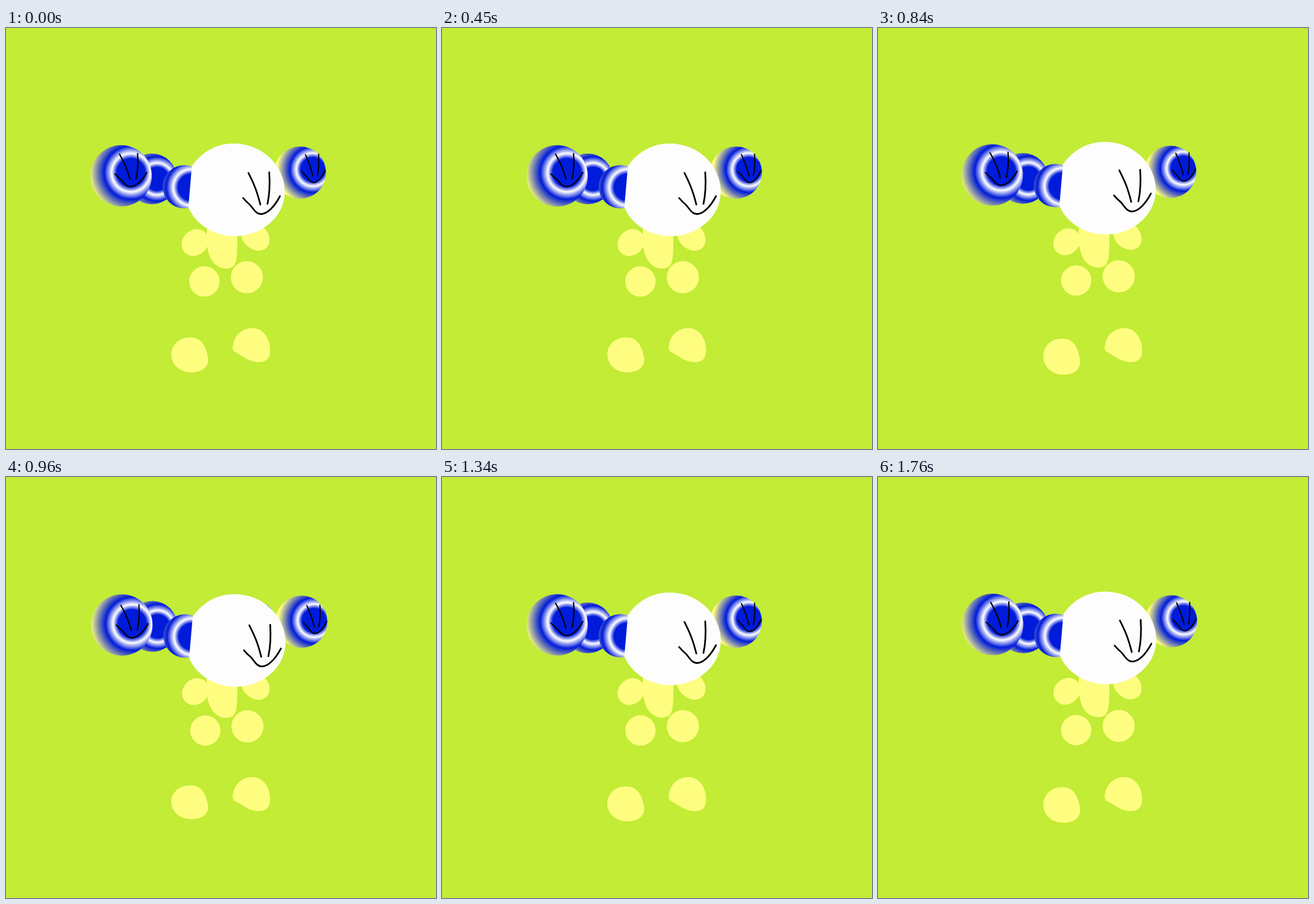
An HTML page with a canvas that plays this animation: 723x707 px, repeating every 1790 ms.

```html
<!DOCTYPE html>
<html>
<head>
<meta charset="utf-8">
<style>
html, body { margin: 0; width: 100%; height: 100%; overflow: hidden; background: #c2ec36; }
canvas { display: block; }
</style>
</head>
<body>
<canvas id="stage" width="723" height="707"></canvas>
<script>
const ctx = document.getElementById('stage').getContext('2d');
const LOOP = 1790, STEPS = 15, TURN = Math.PI * 2;
const GREEN = '#c2ec36', YELLOW = '#fffd80', BLUE = '#001bda', WHITE = '#fdfdfd';

const torsoPath = new Path2D('M339 330C335 352 337 373 345 388C354 404 372 407 382 400C390 393 389 372 389 330Z');
const leftFoot = new Path2D('M308 522C330 521 336 538 340 558C341 575 329 583 311 583C293 583 278 570 278 552C278 535 291 522 308 522');
const rightFoot = new Path2D('M414 504C433 504 444 522 444 540C444 553 440 561 425 561C408 561 399 551 385 544C380 541 381 537 382 532C384 516 397 504 414 504Z');
const headPath = new Path2D('M-75-39.5C-58-65-32-77.5-5-77.5C44-77.5 81-40 81 3.5C81 45 43 78-4 78C-37 78-69 59-81 29.5Z');
const facePath = new Path2D('M-22-34C-13-16-8-5-2 19M13-35Q15-5 10 18M-31 8Q-26 14-20 19C-14 25-10 35-1 35C9 35 21 24 31 5');

// Position in the 15-step bounce.
let step = 0;

// Sideways drift: 1 at the step `peak`.
const drift = peak => Math.cos((step - peak) / STEPS * TURN);

// A pulse of height 1 at the step `peak`; skew makes it come fast and leave slowly.
function pulse(peak, skew) {
  const a = (step - peak) / STEPS * TURN;
  return ((1 + Math.cos(a - skew * (1 - Math.cos(a)))) / 2) ** 2.5;
}

// A part resting at x, y that sways sideways and hops up once per bounce.
const place = (x, y, { sway = 0, right = 3.3, hop = 0, top = 8, skew = 0.4 }) =>
  [x + sway * drift(right), y - hop * pulse(top, skew)];

const shift = ([x, y], dx, dy) => [x + dx, y + dy];

function ellipse([x, y], rx, ry, turn, fill) {
  ctx.fillStyle = fill;
  ctx.beginPath();
  ctx.ellipse(x, y, rx, ry, turn, 0, TURN);
  ctx.fill();
}

const circle = (p, r, fill) => ellipse(p, r, r, 0, fill);

function ball(p, r, [gx, gy], reach) {
  const g = ctx.createRadialGradient(gx, gy, 0, gx, gy, reach);
  g.addColorStop(0.34, BLUE);
  g.addColorStop(0.46, '#fff');
  g.addColorStop(0.64, BLUE);
  g.addColorStop(1, YELLOW);
  circle(p, r, g);
}

function face([x, y], sx, sy, width) {
  const path = new Path2D();
  path.addPath(facePath, new DOMMatrix([sx, 0, 0, sy, x, y]));
  ctx.lineWidth = width;
  ctx.stroke(path);
}

function shape(path, [x, y], fill, stretch = 1) {
  ctx.save();
  ctx.translate(x, y);
  ctx.scale(1, stretch);
  ctx.fillStyle = fill;
  ctx.fill(path);
  ctx.restore();
}

function drawLegs() {
  // The tapping foot flattens while it lifts.
  const lift = pulse(2.3, 0), stretch = 1 - 0.074 * lift;
  shape(leftFoot, [0, 522 * (1 - stretch) - 4 * lift], YELLOW, stretch);
  shape(rightFoot, [0, 0], YELLOW);
  circle(place(335.4, 425.8, { sway: 2.2, right: 6, hop: 8.6, top: 7.9 }), 25.5, YELLOW);
  circle(place(406.2, 418.8, { sway: 1.5, right: 6, hop: 7.8, top: 8.1 }), 27, YELLOW);
  ellipse(place(318.3, 360.5, { sway: 1, right: 5, hop: 9, top: 7.7 }), 24, 21, -Math.PI / 4, YELLOW);
  ellipse(place(419, 350, { hop: 8 }), 27, 21, Math.PI / 4, YELLOW);
  shape(torsoPath, place(0, 1, { hop: 8.6, top: 8.4 }), YELLOW);
}

function drawRightArm() {
  const shoulder = place(417.5, 245, { sway: 3, right: 4.5, hop: 4, top: 7 });
  const hand = place(493.7, 243, { sway: 3.5, hop: 6.7 });
  const smile = place(516.7, 240, { sway: 3.5, hop: 10.5, top: 9.4, skew: 0.7 });
  ball(shoulder, 36, shift(shoulder, -12, 0), 66);
  ball(hand, 43.8, shift(smile, -1.5, 2), 60);
  face(smile, 0.63, 0.68, 2);
}

function drawLeftArm() {
  const shoulder = place(299.5, 267, { sway: 1.8, hop: 8.6, top: 8.4 });
  const forearm = [244.7 + 1.6 * drift(3.3), 248.5 + 5 * drift(14.4)];
  const hand = place(193.3, 248.5, { sway: 1.9, hop: 7.6, top: 8.2 });
  const smile = place(209.4, 243.5, { sway: 3.3, hop: 11.3, top: 9.4, skew: 0.7 });
  ball(forearm, 42.6, shift(forearm, 9, 0), 58);
  ball(hand, 51.5, shift(smile, 0, 4), 70);
  face(smile, 0.865, 0.79, 2.2);
  ball(shoulder, 36.4, shift(shoulder, 12, 1), 66);
}

function drawHead() {
  shape(headPath, place(387.2, 274.5, { sway: 2, hop: 10.2, top: 8.6, skew: 0.7 }), WHITE);
  face(place(429.2, 284, { sway: 2.3, hop: 18.5, top: 9, skew: 0.7 }), 1, 1, 2.8);
}

function draw() {
  ctx.fillStyle = GREEN;
  ctx.fillRect(0, 0, 723, 707);
  ctx.strokeStyle = '#000';
  ctx.lineCap = ctx.lineJoin = 'round';
  drawLegs();
  drawRightArm();
  drawLeftArm();
  drawHead();
}

// Steps last 30 ms, except a single 20 ms one just before 1100 ms.
const stepAt = t => t < 1100 ? Math.floor(t / 30) : 37 + Math.floor((t - 1100) / 30);

const start = performance.now();
function tick() {
  step = stepAt((performance.now() - start) % LOOP) % STEPS;
  draw();
  requestAnimationFrame(tick);
}
tick();
</script>
</body>
</html>
```
